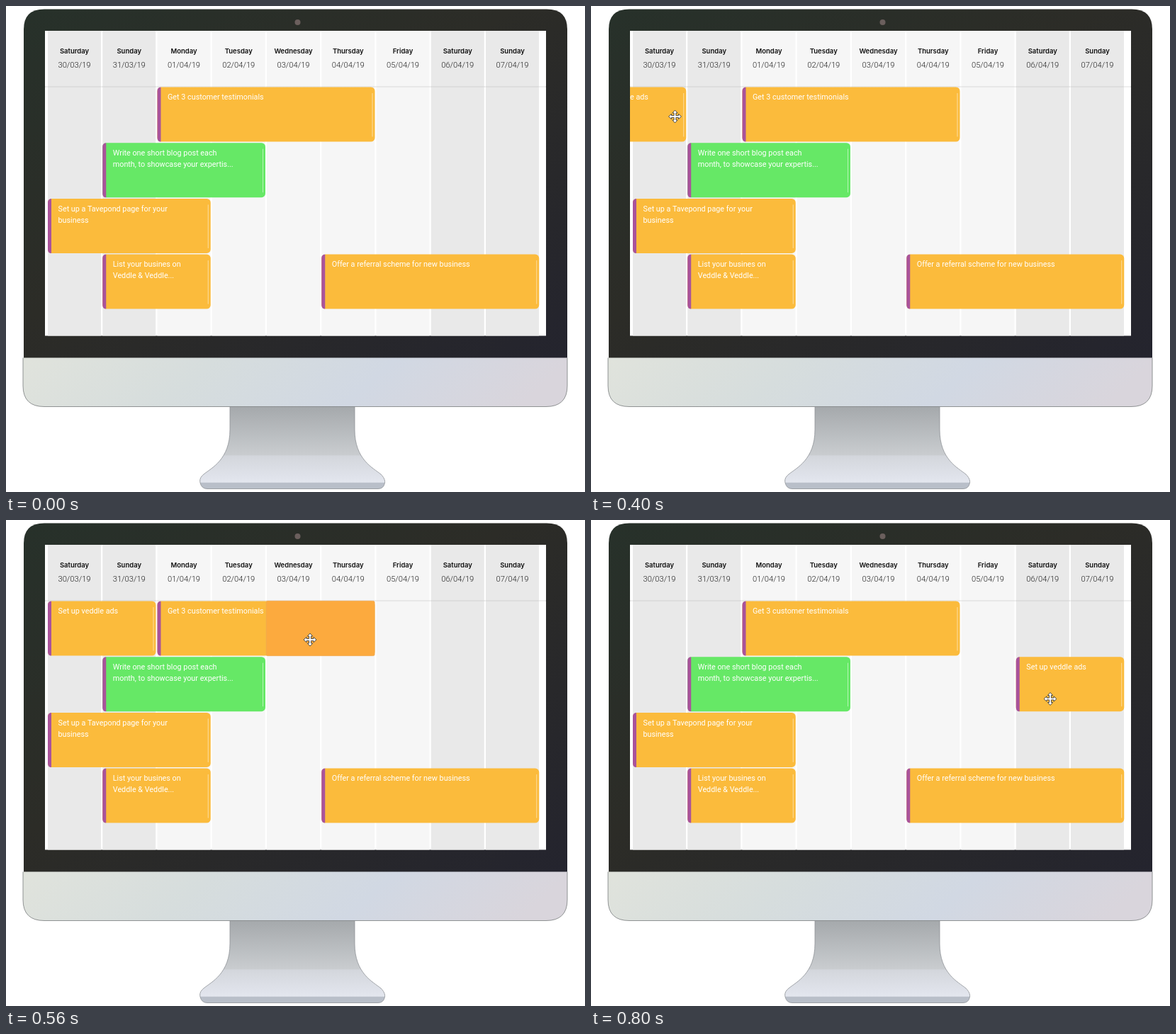
Recreate the animation shown at these times as an HTML page. Size 817 px wide and 686 px high, loop 2.3 s.

```html
<!DOCTYPE html>
<html lang="en">
<head>
<meta charset="utf-8">
<title>Planner board</title>
<style>
  html, body { margin: 0; width: 100%; height: 100%; overflow: hidden; background: #fff; }
  svg { display: block; width: 100vw; height: 100vh; }
  .day { font: 600 9.5px Inter, sans-serif; fill: #111; text-anchor: middle; }
  .date { font: 300 11.2px Roboto, sans-serif; fill: #222; text-anchor: middle; }
  .task { font: 400 10.8px Roboto, sans-serif; fill: #fff; }
</style>
</head>
<body>
<svg viewBox="0 0 817 686">
  <defs>
    <linearGradient id="bezel" x1="0" y1="0" x2="1" y2="1">
      <stop offset="0" stop-color="#27312a"/>
      <stop offset=".45" stop-color="#2c2c27"/>
      <stop offset="1" stop-color="#24242e"/>
    </linearGradient>
    <linearGradient id="chin" x1="0" y1="0" x2="1" y2=".1">
      <stop offset="0" stop-color="#e0e3dc"/>
      <stop offset=".35" stop-color="#d6dddd"/>
      <stop offset=".68" stop-color="#d1d8e3"/>
      <stop offset="1" stop-color="#d9d5dc"/>
    </linearGradient>
    <linearGradient id="stand" x1="0" y1="0" x2="0" y2="1">
      <stop offset="0" stop-color="#a5a9ac"/>
      <stop offset=".59" stop-color="#c9cccf"/>
      <stop offset=".6" stop-color="#d3d6dc"/>
      <stop offset=".92" stop-color="#e3e6ee"/>
      <stop offset=".93" stop-color="#b9bfc9"/>
      <stop offset="1" stop-color="#b9bfc9"/>
    </linearGradient>
    <clipPath id="view"><rect x="55" y="35" width="707" height="430.5"/></clipPath>
  </defs>
  <path d="M316 565V598C316 640 290 652 279 661C274 665 273 669 274 673Q276 681.5 284 681.5H525Q533 681.5 534.5 673C535 669 533 665 529 661C518 652 492 640 492 598V565Z"
    fill="url(#stand)" stroke="#8d9196" stroke-width=".8"/>
  <path d="M25 497V33Q25 4.5 54 4.5H763Q792 4.5 792 33V497Z" fill="url(#bezel)"/>
  <path d="M24 496.5H792V536Q792 565.5 762 565.5H54Q24 565.5 24 536Z" fill="url(#chin)"/>
  <path d="M24 496.5V536Q24 565.5 54 565.5H762Q792 565.5 792 536V496.5" fill="none" stroke="#85888a" stroke-width=".9"/>
  <circle cx="411.5" cy="23" r="4" fill="#6b5f5d"/>
  <rect x="55" y="35" width="707" height="430.5" fill="#fff"/>
  <g id="board" clip-path="url(#view)"></g>
</svg>
<script>
const LOOP = 2300;
const COL = 77.25, LEFT = 59, ROW = 78.7, TOP = 114.5, HEIGHT = 77;
const ORANGE = '#fbbb3c', GREEN = '#66e866', PURPLE = '#a9539b';
const board = document.getElementById('board');

const colX = c => LEFT + c * COL;
const rowY = r => TOP + r * ROW;

function add(parent, tag, attrs, text) {
  const el = document.createElementNS('http://www.w3.org/2000/svg', tag);
  for (const key in attrs) el.setAttribute(key, attrs[key]);
  if (text) el.textContent = text;
  parent.appendChild(el);
  return el;
}

const move = (el, x, y) => el.setAttribute('transform', `translate(${x} ${y})`);
const show = (el, on) => el.setAttribute('visibility', on ? 'visible' : 'hidden');

function card(col, row, span, lines, color = ORANGE) {
  const g = add(board, 'g', {});
  const width = span * COL - 2;
  add(g, 'rect', { width, height: HEIGHT, rx: 5.5, fill: color });
  add(g, 'path', { d: `M5 0H5.5Q0 0 0 5.5V${HEIGHT - 5.5}Q0 ${HEIGHT} 5 ${HEIGHT}Z`, fill: PURPLE });
  add(g, 'path', { d: `M${width - 3.5} 8.5V70`, stroke: '#fff', 'stroke-opacity': .5 });
  lines.forEach((line, i) => add(g, 'text', { class: 'task', x: 14.5, y: 17.7 + i * 16 }, line));
  move(g, colX(col), rowY(row));
  return g;
}

const days = ['Monday', 'Tuesday', 'Wednesday', 'Thursday', 'Friday', 'Saturday', 'Sunday'];
for (let i = 0; i < 9; i++) {
  const day = (i + 5) % 7;
  const date = i < 2 ? `${30 + i}/03/19` : `0${i - 1}/04/19`;
  const x = colX(i), mid = x + 37.5;
  add(board, 'rect', { x, y: 35, width: 75, height: 431, fill: day > 4 ? '#e9e9e9' : '#f6f6f6' });
  add(board, 'text', { class: 'day', x: mid, y: 66.8 }, days[day]);
  add(board, 'text', { class: 'date', x: mid, y: 87 }, date);
}
add(board, 'path', { d: 'M55 114H762', stroke: '#b4b4b4', 'stroke-width': .9, 'stroke-dasharray': '1 1' });

card(2, 0, 4, ['Get 3 customer testimonials']);
card(1, 1, 3, ['Write one short blog post each', 'month, to showcase your expertis...'], GREEN);
card(0, 2, 3, ['Set up a Tavepond page for your', 'business']);
card(1, 3, 2, ['List your busines on', 'Veddle & Veddle...']);
card(5, 3, 4, ['Offer a referral scheme for new business']);

const dropZone = add(board, 'rect', {
  x: colX(4) - .8, y: TOP - .3, width: 2 * COL - 1.5, height: HEIGHT + .5, rx: 2, fill: '#fcaa3e', stroke: '#e9a65a', 'stroke-width': .5
});
const dragged = card(0, 0, 2, ['Set up veddle ads']);

// One quarter of the four-way arrow, turned four times.
const quarter = [[0, -9], [3.6, -5], [1.4, -5], [1.4, -1.4], [5, -1.4], [5, -3.6]];
const arrow = [0, 1, 2, 3].flatMap(turn => quarter.map(([x, y]) => {
  for (let i = 0; i < turn; i++) [x, y] = [-y, x];
  return `${x},${y}`;
}));
const cursor = add(board, 'polygon', {
  points: arrow.join(' '), fill: '#fff', stroke: '#3a3a3a', 'stroke-width': .9, 'stroke-linejoin': 'round'
});

// The card snaps to the grid a little behind the pointer.
const steps = [
  { at: 400, col: -1, row: 0, x: 118.5, y: 156 },
  { at: 480, col: 0, row: 0, x: 238, y: 160 },
  { at: 560, col: 0, row: 0, x: 429, y: 169, zone: true },
  { at: 640, col: 6, row: 0, x: 585, y: 215.5 },
  { at: 720, col: 7, row: 1, x: 627, y: 241 },
  { at: 800, col: 7, row: 1, x: 648, y: 252.5 }
];

function render(t) {
  const step = steps.filter(s => s.at <= t).pop();
  show(dragged, step);
  show(cursor, step);
  show(dropZone, step && step.zone);
  if (!step) return;
  move(dragged, colX(step.col), rowY(step.row));
  move(cursor, step.x, step.y);
}

const start = performance.now();
function tick() {
  render((performance.now() - start) % LOOP);
  requestAnimationFrame(tick);
}
tick();
</script>
</body>
</html>
```
